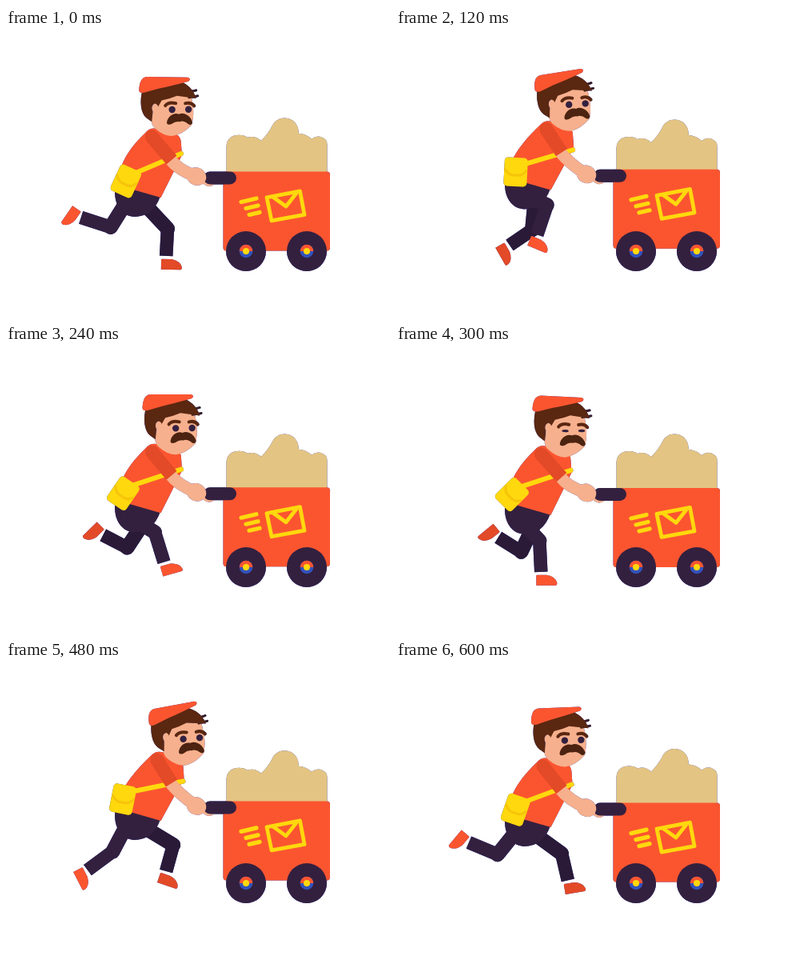
An HTML page with a canvas that plays this animation: 480 by 360 pixels, repeating every 630 ms.

```html
<!DOCTYPE html>
<html lang="en">
<head>
<meta charset="utf-8">
<title>Running postman</title>
<style>
html, body { margin: 0; width: 100%; height: 100%; overflow: hidden; background: #fff; }
canvas { display: block; }
</style>
</head>
<body>
<canvas id="stage" width="480" height="360"></canvas>
<script>
const PERIOD = 630, STEP = 30, DEG = Math.PI / 180;
const stage = document.getElementById('stage').getContext('2d');
const layer = document.createElement('canvas');
layer.width = 480;
layer.height = 360;
const g = layer.getContext('2d');

const ORANGE = '#fb5530', RUST = '#e34a27', SKIN = '#f6b08d', HAIR = '#5a2711',
  NAVY = '#33203f', DARK_NAVY = '#2a1a37', YELLOW = '#ffd80d', GOLD = '#f6c40a',
  SAND = '#e3c483', BLUE = '#3352bd';

// Evenly spaced key values over one loop; angles in degrees, 90 points down.
const HOP = [2, 11, 9, 0.5, 3, 11, 14];
const FAR_LEG = {
  x: 174, drop: 11, thighLength: 41, shinLength: 34, color: DARK_NAVY, shoe: RUST,
  thigh: [47, 85, 112, 123, 88, 41, 22],
  shin: [93, 128, 183, 213, 195, 134, 57]
};
const NEAR_LEG = {
  x: 152, drop: 5, thighLength: 40, shinLength: 39, color: NAVY, shoe: ORANGE,
  thigh: [122, 32, 26, 38, 70, 112, 121],
  shin: [198, 135, 64, 82, 98, 122, 190]
};

// Smooth closed curve through the key values.
function cycle(keys, phase) {
  const n = keys.length, pos = phase * n, i = Math.floor(pos), u = pos - i;
  const [p, a, b, q] = [-1, 0, 1, 2].map(k => keys[(i + k + n) % n]);
  return a + u / 2 * (b - p + u * (2 * p - 5 * a + 4 * b - q + u * (3 * (a - b) + q - p)));
}
const wave = (phase, turns, shift) => Math.cos(phase * turns * 2 * Math.PI - shift * DEG);

function fill(path, color) {
  g.fillStyle = color;
  g.fill(new Path2D(path));
}
function line(path, width, color, cap = 'round') {
  g.strokeStyle = color;
  g.lineWidth = width;
  g.lineCap = cap;
  g.lineJoin = 'round';
  g.stroke(new Path2D(path));
}
function ellipse(x, y, rx, ry, color, tilt = 0) {
  g.fillStyle = color;
  g.beginPath();
  g.ellipse(x, y, rx, ry, tilt * DEG, 0, 7);
  g.fill();
}
function box(x, y, w, h, r, color) {
  g.fillStyle = color;
  g.beginPath();
  g.roundRect(x, y, w, h, r);
  g.fill();
}
function at(x, y, tilt, draw) {
  g.save();
  g.translate(x, y);
  g.rotate(tilt * DEG);
  draw();
  g.restore();
}

function wheel(x) {
  ellipse(x, 279, 25, 25, NAVY);
  ellipse(x, 279, 8.3, 8.3, BLUE);
  fill(`M${x - 8.3} 279a8.3 8.3 0 0 1 16.6 0z`, ORANGE);
  ellipse(x, 279, 4, 4, YELLOW);
}

function cart(y, pileY) {
  at(0, pileY, 0, () => fill(`M275.5 74V36C276 26 283 22 291 22Q298 22 302 25
    Q311 22 319 29Q328 20 333 10C339 -3 360 -3 365 13L366 20Q376 21 382 27
    Q390 21 397 26Q402 28 401.5 36V74Z`, SAND));
  at(0, y, 0, () => {
    box(271.5, 0, 133.5, 99, 4, ORANGE);
    line('M294 38L313 33.5M300 46L315 42.5M304 54L317 51', 5.2, YELLOW);
    line('M326 32.5L367.5 24.5L373 54L332 61.5ZM334 32L350 43.5L363 27', 4.8, YELLOW);
  });
  wheel(300);
  wheel(376);
}

function leg(limb, phase, hipY) {
  const thigh = cycle(limb.thigh, phase), shin = cycle(limb.shin, phase);
  const top = hipY + limb.drop;
  const kneeX = limb.x + limb.thighLength * Math.cos(thigh * DEG);
  const kneeY = top + limb.thighLength * Math.sin(thigh * DEG);
  const ankleX = kneeX + limb.shinLength * Math.cos(shin * DEG);
  const ankleY = kneeY + limb.shinLength * Math.sin(shin * DEG);
  // The foot follows the shin and flattens near the ground.
  const lift = Math.min(1, Math.max(0, (290 - ankleY) / 20));
  const toe = (shin - 90 + 0.14 * (shin - 80)) * lift;
  line(`M${limb.x} ${top}L${kneeX} ${kneeY}`, 18, limb.color);
  line(`M${kneeX} ${kneeY}L${ankleX} ${ankleY}`, 16.5, limb.color, 'butt');
  at(ankleX, ankleY, toe, () =>
    fill('M-6 5Q-6 4 -5 4H7Q18 6 20 14Q20 17 18 17H-6Z', limb.shoe));
}

function pelvis(hipY) {
  fill(`M137 ${hipY - 14}C133 ${hipY + 6} 142 ${hipY + 25} 160 ${hipY + 26}
    Q184 ${hipY + 26} 193 ${hipY}Z`, NAVY);
}

function shirt(hipY, x, y, chest) {
  fill(`M138 ${hipY - 14}C143 ${hipY - 34} ${x - 38} ${y + 24} ${x - 8} ${y - 5}
    Q${x - 2} ${y - 12} ${x + 6} ${y - 10}L${chest - 6} ${y - 3}
    Q${chest} ${y} ${chest} ${y + 8}L${chest + 1} ${y + 23}L193.5 ${hipY + 2}Z`, ORANGE);
}

function bag(hop, sway, strapX, strapY) {
  const x = 147.3 - 0.9 * sway, y = 191 - 1.2 * hop - sway;
  line(`M${x + 9} ${y - 9}L${strapX} ${strapY}`, 6, YELLOW);
  at(x, y, 38 - 2.4 * hop + 3 * sway, () => {
    box(-14.5, -18, 29, 36, 4.5, YELLOW);
    line('M-13 -2Q-8 5 0 4Q9 5 13 -2', 3, GOLD);
  });
}

function face(open) {
  fill(`M-29 -34L14 -31C18 -14 18 -3 15 7Q4 19 -9 21Q-20 21 -30 12
    Q-36 7 -35 0Z`, SKIN);
  ellipse(-9.5, -12, 4.2, 4.2 * open, NAVY);
  ellipse(11, -12.5, 4.2, 4.2 * open, NAVY);
  line('M-18 -17Q-14 -22 -5 -20M7 -20Q14 -22 18 -17', 4, HAIR);
  fill(`M-16 4C-15 -3 -8 -9 -1 -6.5C6 -10 15 -3 16 4Q15 8 11 6
    Q5 1 0 3Q-5 2 -10 6Q-16 8 -16 4Z`, '#4c2310');
}

function hair() {
  line('M225 82L237 79M228 88L239 86', 2.8, '#3a1d22');
  fill(`M170 78C166 94 168 108 175 114L182 119L183 106Q180 98 186 96L189 101
    L194 92Q204 90 213 86L237 89Q232 72 212 66Z`, HAIR);
  ellipse(186, 102, 4, 5.5, SKIN);
}

function cap() {
  fill(`M165.5 80C166 70 168 64 175 63L226 62.5Q231 64 227 67.5Q205 74 190 77.5
    L172 83Q166 84 165.5 80Z`, ORANGE);
}

function head(hop, sway, open) {
  const x = 200 + 0.6 * hop + sway, y = 75 - 0.65 * hop + 0.6 * sway;
  const tilt = 3.5 - 1.05 * hop;
  const pivoted = draw => () => {
    g.translate(-197.5, -73.5);
    draw();
  };
  at(218 + 0.95 * hop + sway, 118.5 - 0.75 * hop + sway, tilt * 0.3, () => face(open));
  at(x, y, tilt * 0.5, pivoted(hair));
  at(x, y, tilt, pivoted(cap));
}

function arm(x, y, hipY, gripY) {
  const elbowY = hipY - 45;
  line(`M205 ${elbowY - 1}Q216 ${elbowY + 13} 236 ${gripY - 3}`, 15, SKIN);
  ellipse(238, gripY - 2, 12.5, 11, SKIN, 25);
  line(`M${x} ${y}L207 ${elbowY}`, 17, RUST, 'butt');
  ellipse(x, y, 8.5, 8.5, RUST);
}

function scene(t) {
  const phase = t / PERIOD;
  const hop = cycle(HOP, phase), sway = -3.3 * wave(phase, 1, 30);
  const hipY = 212 - hop, cartY = 180 - 0.28 * hop, gripY = cartY + 8;
  const shoulderX = 181 + 0.6 * hop, shoulderY = 138 - hop;
  const chest = shoulderX * 0.4 + 146;
  const blink = Math.max(0, 1 - Math.abs(t - 300) / 60);

  g.clearRect(0, 0, 480, 360);
  cart(cartY, cartY - 65.5 + 2.7 * wave(phase, 2, 140));
  ellipse(254, gripY + 2, 9, 8.5, SKIN);
  line(`M255 ${gripY}H280`, 16, NAVY);
  leg(FAR_LEG, phase, hipY);
  pelvis(hipY);
  leg(NEAR_LEG, phase, hipY);
  shirt(hipY, shoulderX, shoulderY, chest);
  bag(hop, sway, chest, shoulderY / 2 + 89);
  head(hop, sway, 1 - 0.6 * blink);
  arm(shoulderX, shoulderY, hipY, gripY);
}

function frame() {
  scene(Math.floor(performance.now() % PERIOD / STEP) * STEP);
  stage.shadowBlur = 0;
  stage.fillStyle = '#fff';
  stage.fillRect(0, 0, 480, 360);
  // thin blue rim around the silhouette
  stage.shadowColor = '#3040c0';
  stage.shadowBlur = 1.5;
  stage.drawImage(layer, 0, 0);
  requestAnimationFrame(frame);
}
frame();
</script>
</body>
</html>
```
